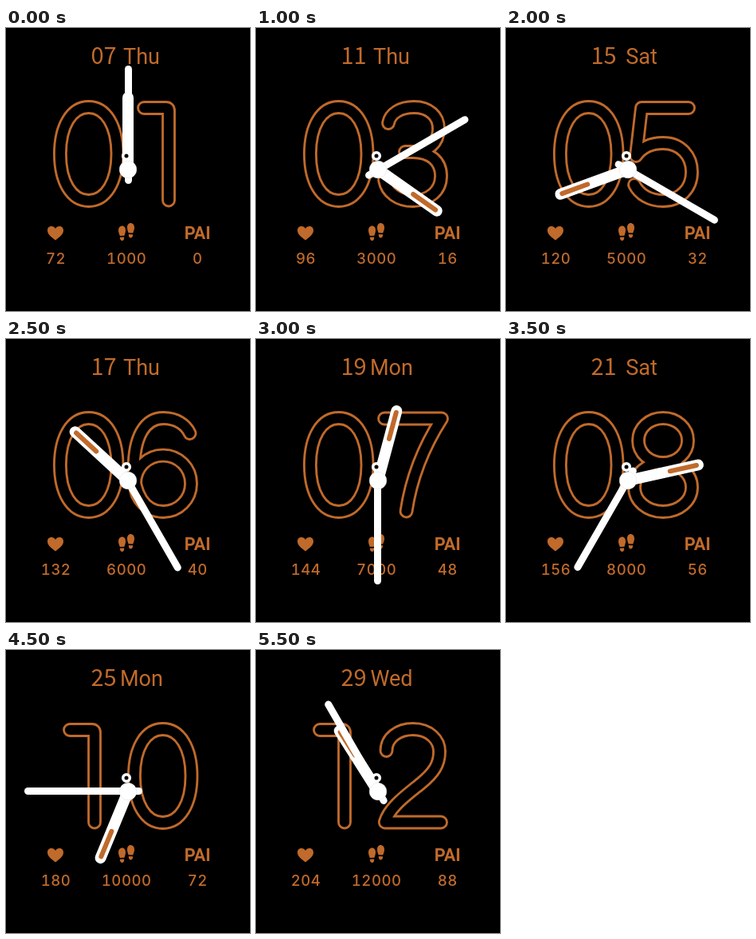
Write an HTML page that moves like this. It is 306x354 px and loops after 6 s.

```html
<!DOCTYPE html>
<html lang="en">
<head>
<meta charset="utf-8">
<title>Watch face</title>
<style>
  html, body { margin: 0; width: 100%; height: 100%; overflow: hidden; background: #000; }
  svg { display: block; width: 306px; height: 354px; }
  text { fill: #c06a2b; text-anchor: middle; }
  .num { font: 400 29px "Noto Sans CJK SC", "Noto Sans CJK JP", sans-serif; }
  .week { font: 400 27px Roboto, sans-serif; }
  .label { font: 700 21.5px Roboto, sans-serif; }
  .stat { font: 500 18.6px Inter, sans-serif; font-variant-numeric: tabular-nums; letter-spacing: .5px; }
  .icon { fill: #c06a2b; }
  .digit path { fill: none; stroke-linecap: round; stroke-linejoin: round; }
  .edge { stroke: #c06a2b; stroke-width: 17.8px; }
  .core { stroke: #000; stroke-width: 12.1px; }
  .hand line { stroke: #fff; stroke-linecap: round; }
  .hand .slot { stroke: #c06a2b; }
</style>
</head>
<body>
<svg viewBox="0 0 306 354">
  <text id="day" class="num" x="122.500" y="45.300"></text>
  <text id="week" class="week" x="170" y="45"></text>

  <g class="digit" transform="translate(-93 0)"><path class="edge"/><path class="core"/></g>
  <g class="digit"><path class="edge"/><path class="core"/></g>

  <path class="icon" d="M62 265.500C57 261.500 52 258 52 253.200C52 249.800 54.400 248 57 248C59.200 248 61 249.200 62 251C63 249.200 64.800 248 67 248C69.600 248 72 249.800 72 253.200C72 258 67 261.500 62 265.500Z"/>
  <g class="icon">
    <g id="foot">
      <path d="M145 247.500C148 247 150 249.500 150 253C150 256 149 257.500 148.500 259.700L142.800 260C142 257.500 141 256 141 253C141 250 142.500 248 145 247.500Z"/>
      <path d="M142.800 261.800L148.200 261.500C148.400 264 147.500 266 145.700 266C143.800 266 142.800 264.300 142.800 261.800Z"/>
    </g>
    <use href="#foot" transform="translate(302 -3.500) scale(-1 1)"/>
  </g>
  <text class="label" x="240.200" y="263.700">PAI</text>

  <text id="pulse" class="stat" x="62.500" y="295"></text>
  <text id="steps" class="stat" x="151.200" y="295"></text>
  <text id="pai" class="stat" x="240.300" y="295"></text>

  <g transform="translate(153 177)">
    <g id="hour" class="hand">
      <line y1="0" y2="-90" stroke-width="14"/>
      <line class="slot" y1="-54" y2="-88" stroke-width="6"/>
    </g>
    <g id="minute" class="hand">
      <line x1=".5" x2=".5" y1="13.500" y2="-125.500" stroke-width="9"/>
    </g>
    <circle r="10.800" fill="#fff" stroke="#ddd" stroke-width=".5"/>
  </g>
  <circle cx="151" cy="160" r="4.300" fill="#000" stroke="#fff" stroke-width="3.600"/>
</svg>
<script>
const STEP = 500, COUNT = 12;
const NAMES = ["Sun", "Mon", "Tue", "Wed", "Thu", "Fri", "Sat"];
const $ = id => document.getElementById(id);

function oval(cx, cy, rx, ry, k = 0.56) {
  const a = rx * k, b = ry * k;
  return `M${cx} ${cy - ry}c${a} 0 ${rx} ${ry - b} ${rx} ${ry}s${a - rx} ${ry} ${-rx} ${ry}` +
    `s${-rx} ${b - ry} ${-rx} ${-ry}s${rx - a} ${-ry} ${rx} ${-ry}Z`;
}

// Centre lines of the right-hand digit; the left one is shifted.
const DIGITS = [
  oval(196.7, 157.5, 35.8, 58.5, 0.6),
  "M173 100H201Q204 100 204 103V215.500",
  "M163.500 126C163.500 110 178 99 197 99C217 99 230 112 230 127C230 143 223 154 206 167.500C188 182 167 197 161.700 215.500H232",
  "M166 119C168 107 181 99 198 99C217 99 229 110 229 126C229 144 216 155 197 155H187M197 155C219 155 232 167 232 185C232 204 217 216 197 216C178 216 164 206 161 190",
  "M214 215.500V99.500L161 185H232",
  "M229 100H170L163 160C170 150 182 144 197 144C219 144 233 160 233 180C233 201 218 216 197 216C180 216 167 208 161 196",
  "M197 216C173.500 216 160.500 193 160.500 163C160.500 123 173.500 99 197.500 99C213.500 99 225.500 107 230.500 118" + oval(197, 180.8, 35, 35.2),
  "M161 99.500H233C216 126 196 165 188.500 215.500",
  oval(197, 127, 31, 28) + oval(197, 185.5, 36, 30.5),
  "M196.500 99C220 99 233 122 233 152C233 192 220 216 196 216C180 216 168 208 163 197" + oval(196.5, 134.2, 35, 35.2)
];

const slots = document.querySelectorAll(".digit");
const pad = n => String(n).padStart(2, "0");
const turn = (id, deg) => $(id).setAttribute("transform", `rotate(${deg})`);

function draw(i) {
  const month = i + 1, day = 7 + 2 * i;
  $("day").textContent = pad(day);
  $("week").textContent = NAMES[new Date(Date.UTC(2021, i, day)).getUTCDay()];
  $("pulse").textContent = 72 + 12 * i;
  $("steps").textContent = 1000 * month;
  $("pai").textContent = 8 * i;
  [...pad(month)].forEach((c, n) => {
    for (const p of slots[n].children) p.setAttribute("d", DIGITS[c]);
  });
  turn("minute", 30 * i);
  turn("hour", 62.5 * i);
}

let shown = 0;
const start = performance.now();
function tick() {
  const i = Math.floor((performance.now() - start) / STEP) % COUNT;
  if (i !== shown) draw(shown = i);
  requestAnimationFrame(tick);
}
draw(0);
tick();
</script>
</body>
</html>
```
